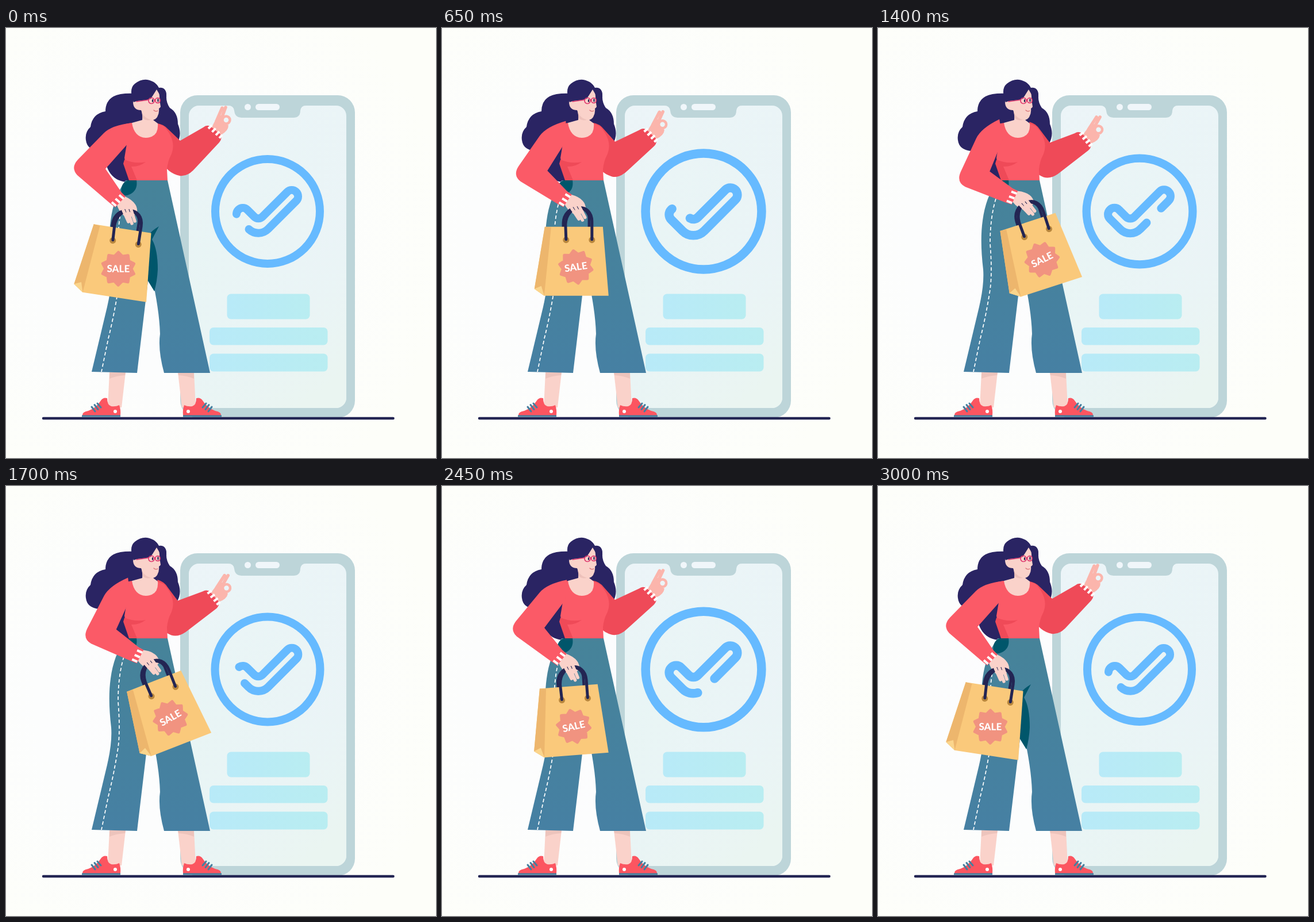
An HTML page for the animation above (3.05 s loop, 748 px wide and 748 px high).

```html
<!DOCTYPE html>
<html lang="en">
<head>
<meta charset="utf-8">
<title>Sale checkout</title>
<style>
  html, body { margin: 0; width: 100%; height: 100%; overflow: hidden; background: #fcfcfc; }
  svg { display: block; width: 100vw; height: 100vh; }
  .round { fill: none; stroke-linecap: round; stroke-linejoin: round; }
  .skin { fill: #fad2ca; }
  .hand { fill: #fbb5ac; }
  .red { fill: #fb5a67; }
  .deep { fill: #ef4a58; }
  .hair { fill: #2a2463; }
  .teal { stroke: #467f9f; }
  .dark { fill: #00566b; }
  .navy { stroke: #232553; }
  .blue { stroke: #66baff; }
  text { font: 800 17px Nunito, Lato, "Open Sans", sans-serif; fill: #fff; }
</style>
</head>
<body>
<svg viewBox="0 0 748 748">
  <defs>
    <radialGradient id="bg" gradientUnits="userSpaceOnUse" cx="280" cy="370" r="500">
      <stop offset="0" stop-color="#fcfcfe"/>
      <stop offset=".45" stop-color="#fcfdfd"/>
      <stop offset="1" stop-color="#fdfef9"/>
    </radialGradient>
    <linearGradient id="screen" x1="0" y1=".2" x2="1" y2=".6">
      <stop offset="0" stop-color="#e8f5f4"/>
      <stop offset="1" stop-color="#ebf4f7"/>
    </linearGradient>
    <linearGradient id="glow" x1=".3" y1="0" x2=".7" y2="1">
      <stop offset="0" stop-color="#edf4f9" stop-opacity=".7"/>
      <stop offset=".45" stop-color="#e9f4f7" stop-opacity="0"/>
      <stop offset="1" stop-color="#eaf5f1"/>
    </linearGradient>
    <linearGradient id="bar">
      <stop offset="0" stop-color="#b8eaf8"/>
      <stop offset="1" stop-color="#b9edf1"/>
    </linearGradient>
    <linearGradient id="denim" x1="0" y1="0" x2="0" y2="1">
      <stop offset="0" stop-color="#468399"/>
      <stop offset="1" stop-color="#4680a3"/>
    </linearGradient>
    <path id="glass" d="M336 135H386Q396 135 397 144Q398 156 410 156H500Q512 156 512 144Q513 135 522 135H574A18 18 0 0 1 592 153V643A18 18 0 0 1 574 661H336A18 18 0 0 1 318 643V153A18 18 0 0 1 336 135Z"/>
    <g id="foot">
      <path class="skin" d="M180 599H208L201 660H177Z"/>
      <path fill="#edc4bc" d="M180 599H208L207 604Q192 605 180 610Z"/>
      <path fill="#fc5560" d="M133 674Q132 668 143 666Q157 661 165 648Q169 642 176 644Q176 656 183 658Q191 659 197 656Q200 664 199 674Z"/>
      <path class="round teal" stroke-width="3" d="M149 659L155 667M154 655.500L160 663.500M159 653L165 660"/>
      <path class="teal" stroke-width="3" d="M132 675H199"/>
      <circle cx="190" cy="667" r="3" fill="#fff"/>
    </g>
  </defs>

  <rect width="748" height="748" fill="url(#bg)"/>

  <!-- phone -->
  <rect x="303" y="117" width="304" height="561" rx="30" fill="#bdd5d9"/>
  <use href="#glass" fill="url(#screen)"/>
  <use href="#glass" fill="url(#glow)"/>
  <g fill="#f0f6fa">
    <circle cx="420.500" cy="137.500" r="5.500"/>
    <rect x="434" y="132" width="42" height="11" rx="5.500"/>
  </g>
  <g fill="url(#bar)">
    <rect x="384.500" y="462.500" width="144" height="44" rx="7"/>
    <rect x="354" y="521" width="205.500" height="30.500" rx="7"/>
    <rect x="354" y="566.500" width="205.500" height="31" rx="7"/>
  </g>
  <g id="badge" class="round blue" stroke-width="14">
    <circle cx="455" cy="319" r="91"/>
    <path id="tick" pathLength="295" stroke-dasharray="260 35" d="M419.800 316.200L431.900 328.300A10 10 0 0 0 446.100 328.300L489.200 285.200A11 11 0 0 1 504.800 300.800L456 349.600A24 24 0 0 1 422 349.600L404.200 331.800A11 11 0 0 1 419.800 316.200"/>
  </g>

  <!-- hair behind -->
  <path class="hair" d="M224 114Q198 113 187 119Q173 127 173 145Q150 149 147 172Q137 181 139 195Q141 212 162 214L175 240Q185 269 216 268L255 220L297 202Q307 186 299 167Q299 147 285 139Q278 129 279 116Q278 103 266 104Z"/>

  <!-- raised arm -->
  <g id="wave">
    <path class="hand" d="M358 173Q363 161 370 152L379 152L378 160Q380 167 387 169Q387 179 374 186Z"/>
    <path class="round" stroke="#fbb5ac" stroke-width="5.500" d="M366 162L376 139M375 157L382 138"/>
    <circle cx="383" cy="160" r="6.500" fill="none" stroke="#fbb5ac" stroke-width="4.500"/>
    <path class="deep" d="M262 166Q274 167 282 176L303 196L343 173Q350 167 357 172L373 185Q377 192 371 199L329 244Q316 259 302 257Q288 254 279 244Z"/>
    <path stroke="#fff" stroke-width="4" d="M352 175L358 169M358.500 181L364.500 174.500M365 186.500L371 180M371 191.500L376 186"/>
  </g>

  <!-- legs -->
  <use href="#foot"/>
  <use href="#foot" transform="matrix(-1 0 0 1 507 0)"/>
  <path class="round navy" stroke-width="4.500" d="M65 679H673.500"/>
  <path fill="url(#denim)" d="M208 265H281L355 600H275Q264 560 268 532Q267 500 259 458L247 440L228 600L149 598L176 485Q185 446 183 420Q177 370 182 335Q187 295 208 265Z"/>
  <path class="dark" d="M266 345Q254 352 246 362V438L258 458Q263 440 264 420Q264 385 254 368Q259 358 266 345ZM201 290Q198 270 212 265H227Q230 283 214 290Q206 293 201 290Z"/>
  <path fill="none" stroke="#fff" stroke-width="1.700" stroke-dasharray="6 4" d="M205 297Q195 330 195 375Q199 425 195 455Q188 500 178 540L166 598"/>

  <!-- torso -->
  <path class="red" d="M219 165Q196 168 183 178L211 196L206 226L215 265H281L280 246Q281 232 288 219Q297 196 275 171L264 166L240 180Z"/>
  <path class="deep" d="M206 229Q225 237 243 233Q231 242 218 241L228 265H214L204 236Z"/>
  <path class="skin" d="M219 165L237 160L238 140L260 157L256 160L264 166Q266 190 243 191Q223 190 219 165Z"/>
  <path fill="#eec2bb" d="M236 146L253 159Q246 163 238 157Z"/>

  <!-- head -->
  <path class="skin" d="M222 124Q232 122 238 118L262 106Q268 112 267 124L269 137Q268 139 266 140Q267 148 263 155Q258 162 250 159Q238 155 235 143Q222 143 221 130Z"/>
  <path class="hair" d="M222 129Q213 106 224 97Q240 84 257 94Q263 98 266 104Q280 102 279 121L268 117L262 107Q257 115 252 123Q247 125 237 126L228 127Z"/>
  <g class="round" stroke="#df3b70" stroke-width="1.700">
    <path d="M227 128L248 125M258 125H260"/>
    <circle cx="253" cy="126.500" r="5"/>
    <circle cx="264" cy="126" r="4.300"/>
  </g>
  <path class="round navy" stroke-width="2.200" d="M255 125V128M264.500 124V127.500"/>
  <path class="round" stroke="#d87378" stroke-width="1.300" d="M257 143Q260 146 264 144"/>

  <!-- resting arm and bag -->
  <g class="arm">
    <path class="skin" d="M193 308L207 293Q220 299 225 307Q229 313 228 322L214 331Q199 326 193 308Z"/>
  </g>
  <g id="bag">
    <path class="round navy" stroke-width="4.500" d="M-23 40V22C-22-9 18-12 22 12V40"/>
    <path fill="#fac97b" d="M-55 29H46L56 149H-56L-73 137Z"/>
    <path fill="#edb66d" d="M-55 29L-44 30L-56 149L-73 137Z"/>
    <path fill="#fbd58c" d="M-73 137L-61 132L-56 149Z"/>
    <g fill="#b9873e">
      <circle cx="-18" cy="52" r="5.500"/>
      <circle cx="27" cy="52" r="5.500"/>
    </g>
    <path class="round navy" stroke-width="5" d="M-18 51L-19 25C-17-12 27-14 27 20V51"/>
    <g transform="translate(-1 99) rotate(-8.500)">
      <path id="star" fill="#f19380" stroke="#f19380" stroke-width="5" stroke-linejoin="round"/>
      <text text-anchor="middle" y="6">SALE</text>
    </g>
  </g>
  <g class="arm">
    <path class="round" stroke="#fad2ca" stroke-width="5.500" d="M204 317L213 337M210 314L219 340M217 314L224 336"/>
    <path class="red" d="M219 165Q184 169 170 183L125 229Q112 243 124 256L180 304Q186 309 190 312L208 293L201 286L173 245L213 200Z"/>
    <path stroke="#fff" stroke-width="4" d="M184 303L191.500 309.500M190.500 297L198 303.500M197 290.500L204.500 297"/>
  </g>
</svg>
<script>
  const LOOP = 3050, END = 3000;
  const TIMES = [0, 650, 1050, 1400, 2000, 2450, END];
  const $ = id => document.getElementById(id);
  const rad = deg => deg * Math.PI / 180;
  const ease = x => (1 - Math.cos(Math.PI * x)) / 2;

  // Out to 1 at the peak time, then back to 0.
  const swing = (t, peak) => t < peak ? ease(t / peak) : ease((END - t) / (END - peak));

  // Smooth curve through values at TIMES, at rest on both ends.
  function track(values) {
    const last = values.length - 1;
    const slope = i => i === 0 || i === last ? 0
      : (values[i + 1] - values[i - 1]) / (TIMES[i + 1] - TIMES[i - 1]);
    return t => {
      let i = 0;
      while (i < last - 1 && t > TIMES[i + 1]) i++;
      const span = TIMES[i + 1] - TIMES[i];
      const u = (t - TIMES[i]) / span, v = 1 - u;
      return v * v * ((1 + 2 * u) * values[i] + u * span * slope(i))
        + u * u * ((3 - 2 * u) * values[i + 1] - v * span * slope(i + 1));
    };
  }

  const wave = track([0, .45, .8, .98, .96, .52, 0]);
  const gap = track([252, 297, 370, 459, 656, 782, 842]);

  const PULSE = [0, 760, 1600, 2350, END];
  function pulse(t) {
    const i = Math.max(0, PULSE.findIndex(p => t <= p) - 1);
    const x = ease((t - PULSE[i]) / (PULSE[i + 1] - PULSE[i]));
    return 1 + .115 * (i % 2 ? 1 - x : x);
  }

  const SHOULDER = [197, 185], GRIP = [14.5, 136];

  function draw(t) {
    const turn = -19.5 * swing(t, 1320);
    const c = Math.cos(rad(turn)), s = Math.sin(rad(turn));
    for (const arm of document.querySelectorAll('.arm'))
      arm.setAttribute('transform', `rotate(${turn} ${SHOULDER})`);

    const x = SHOULDER[0] + GRIP[0] * c - GRIP[1] * s;
    const y = SHOULDER[1] + GRIP[0] * s + GRIP[1] * c;
    const tilt = 8.8 - 30.3 * swing(t, 1800);
    $('bag').setAttribute('transform', `translate(${x} ${y}) rotate(${tilt})`);

    $('wave').setAttribute('transform', `rotate(${9.5 * wave(t)} 280 172)`);
    $('badge').setAttribute('transform',
      `translate(455 319) scale(${pulse(t)}) translate(-455 -319)`);
    $('tick').setAttribute('stroke-dashoffset', -((gap(t) + 17.5) % 295));
  }

  const points = Array.from({ length: 20 }, (_, i) => {
    const r = i % 2 ? 22.5 : 28.5, a = rad(i * 18);
    return `${(r * Math.sin(a)).toFixed(1)} ${(-r * Math.cos(a)).toFixed(1)}`;
  });
  $('star').setAttribute('d', `M${points.join('L')}Z`);

  const start = performance.now();
  function tick() {
    draw(Math.min((performance.now() - start) % LOOP, END));
    requestAnimationFrame(tick);
  }
  tick();
</script>
</body>
</html>
```
